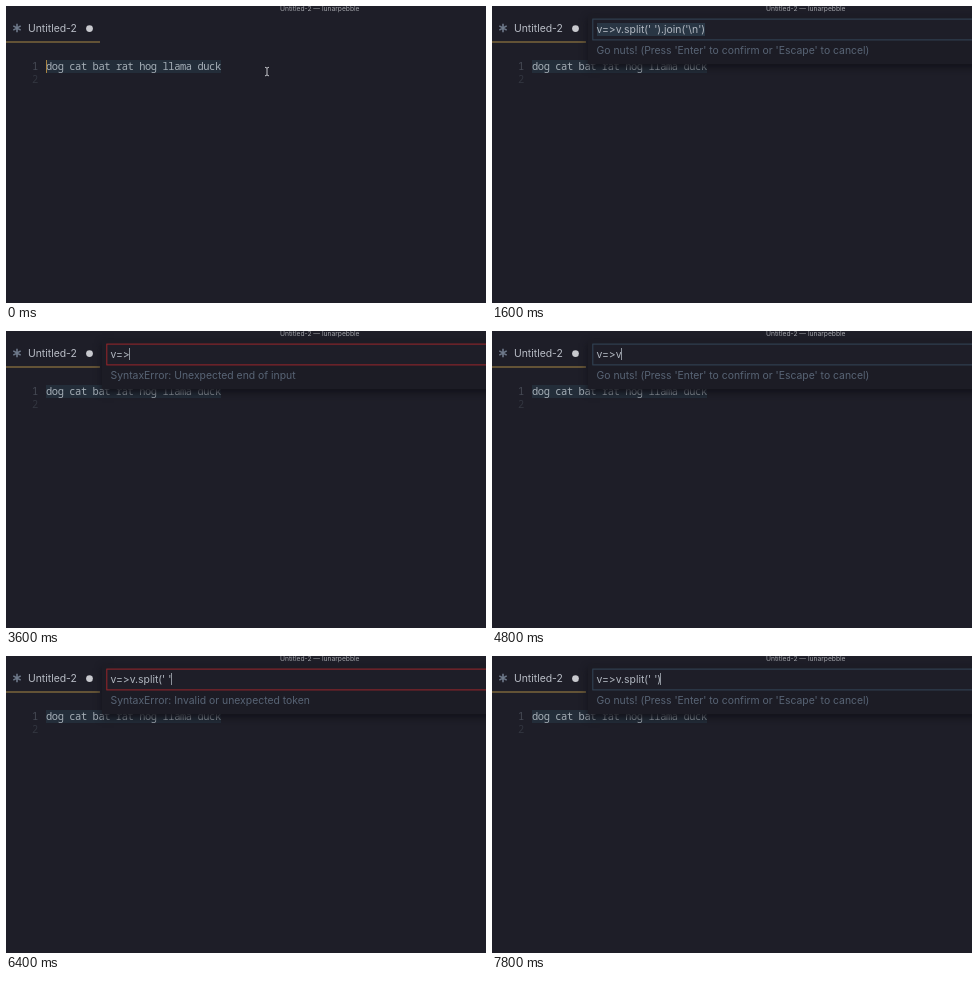
Recreate the animation shown at these times as an HTML page. Size 480 px wide and 297 px high, loop 8000 ms.

```html
<!DOCTYPE html>
<html lang="en">
<head>
<meta charset="utf-8">
<title>Editor</title>
<style>
  html, body { margin: 0; width: 100%; height: 100%; overflow: hidden; background: #1e1e28; }
  body {
    position: relative;
    font: 10.4px/17.64px Inter, Roboto, sans-serif;
    font-variant-ligatures: none;
    font-feature-settings: "calt" 0;
    color: #586475;
    white-space: pre;
  }
  body div, body svg { position: absolute; }
  [hidden] { display: none !important; }

  #title { left: 274px; top: -5px; line-height: 17px; font-size: 6.7px; color: #a3a5ab; }
  #tab { left: 22px; top: 14px; color: #b9bdc6; }
  #chrome { left: 0; top: 0; }

  .code { font: 10.4px/13.4px "Noto Sans Mono", "DejaVu Sans Mono", monospace; letter-spacing: -.41px; }
  .number { left: 26px; color: #474b56; }
  #words { left: 40px; top: 54px; color: #a6afb7; background: #232d39; }
  #editorCaret { left: 39.6px; top: 54px; width: 1.2px; height: 13px; background: #a98443; }

  #widget { left: 96px; top: 8px; width: 480px; background: #1c1c25; box-shadow: 0 4px 7px #12121a; }
  #frame { left: 0; top: 0; fill: #1e1e28; stroke: #324557; }
  #frame.error { stroke: #9a252b; }
  #input { left: 8.5px; top: 6px; line-height: 20.6px; color: #b2b8c1; }
  #input .selected { background: #293644; }
  #input .hint { color: #555b67; }
  #caret { display: inline-block; width: 1px; height: 12px; margin: 0 -.3px 0 -.7px; vertical-align: -2.2px; background: #8d929b; }
  #message { left: 8.5px; top: 27.7px; }
  #list { left: 0; top: 30.4px; width: 480px; }
  #list div { position: relative; height: 17.64px; padding-left: 8.5px; }
  #list div:first-child { background: #191920; }
  #list span { position: absolute; left: 359px; color: #424854; }
  #pointer { left: 0; top: 0; }
</style>
</head>
<body>
<div id="title">Untitled-2 — lunarpebble</div>
<svg id="chrome" width="100" height="40">
  <path transform="translate(11 22)" d="M0-4.3V4.3M-3.7-2.1 3.7 2.1M-3.7 2.1 3.7-2.1" stroke="#6e798a" stroke-width="1.6"/>
  <circle cx="83.5" cy="22.6" r="3.4" fill="#c8c9ce"/>
  <path d="M0 36H94" stroke="#a88744" stroke-width="1.1"/>
</svg>
<div id="tab">Untitled-2</div>

<div class="code number" style="top:54px">1</div>
<div class="code number" style="top:67.4px;color:#32353f">2</div>
<div class="code" id="words">dog cat bat rat hog llama duck</div>
<div id="editorCaret"></div>

<div id="widget" hidden>
  <svg id="frame" width="480" height="30"><rect x="4.8" y="5.1" width="490" height="20.8"/></svg>
  <div id="input"><span id="typed"></span><span id="caret"></span><span id="hint" class="hint"></span></div>
  <div id="message"></div>
  <div id="list"></div>
</div>

<svg id="pointer" width="480" height="297" fill="none" stroke-linejoin="round">
  <path id="beam" d="M259 61.3q2 0 2 1.3 0-1.3 2-1.3M261 62.6v6M259 69.8q2 0 2-1.3 0 1.3 2 1.3" stroke="#c5c6cb"/>
  <path id="hand" d="M259.5 65.2q0-1.1.9-1.1t.9 1.1v2.8l3.3.8q1.1.3 1 1.4l-.7 3.4h-4.1l-2.6-3.4q-.4-1.1.4-1.1l.9.7z" fill="#e6e6e9" stroke="#17171d" stroke-width=".6"/>
</svg>

<script>
const LOOP = 8000;
const FULL = "v=>v.split(' ').join('\\n')";
const OK = "Go nuts! (Press 'Enter' to confirm or 'Escape' to cancel)";
const NOT_FUNCTION = "TypeError: mapFn is not a function";
const UNDEFINED = "ReferenceError: v is not defined";
const END = "SyntaxError: Unexpected end of input";
const TOKEN = "SyntaxError: Invalid or unexpected token";
const PAREN = "SyntaxError: missing ) after argument list";

const commands = [
  "Lunarpebble (custom map function)",
  "Lunarpresets (preset map functions)",
  "Preferences: Open User Settings",
  "Preferences: Open Settings (JSON)",
  "Map and Replace Selections with JavaScript Function",
  "Lunarsorts (preset sorting functions)",
  "Developer: Show Running Extensions",
  "FVTidy: Create FVTidy configuration"
];

// Start time, typed text, validation message, caret visible
const prompts = [
  [1600, FULL, OK, false],
  [2600, "", OK, true],
  [2800, "", NOT_FUNCTION, true],
  [3000, "v", NOT_FUNCTION, true],
  [3200, "v", UNDEFINED, true],
  [3600, "v=>", END, true],
  [4200, "v=>", END, false],
  [4600, "v=>v", END, true],
  [4800, "v=>v", OK, true],
  [5000, "v=>v.", OK, true],
  [5200, "v=>v.s", END, true],
  [5400, "v=>v.spl", OK, true],
  [5600, "v=>v.split", OK, true],
  [5800, "v=>v.split(", OK, true],
  [6000, "v=>v.split(", END, true],
  [6200, "v=>v.split('", TOKEN, true],
  [6400, "v=>v.split(' '", TOKEN, true],
  [6600, "v=>v.split(' '", PAREN, true],
  [6800, "v=>v.split(' ')", PAREN, true],
  [7000, "v=>v.split(' ')", OK, true],
  [7400, "v=>v.split(' ')", OK, false],
  [7800, "v=>v.split(' ')", OK, true]
];

const get = id => document.getElementById(id);
const show = (id, on) => { get(id).style.display = on ? "" : "none"; };
const start = performance.now();

get("list").innerHTML = commands
  .map((name, i) => `<div>${name}${i ? "" : "<span>recently used</span>"}</div>`)
  .join("");

function render(t) {
  const open = t >= 600;
  const listing = open && t < 1600;
  const prompt = prompts.filter(([time]) => time <= t).pop();
  const [, text, message, caret] = prompt || [0, ">", "", t < 1000];

  get("widget").hidden = !open;
  get("widget").style.height = listing ? "176px" : "50px";
  show("editorCaret", !open);
  show("beam", !open);
  show("hand", open && t < 1200);
  show("list", listing);
  show("caret", caret);

  get("typed").textContent = text;
  get("typed").className = text === FULL ? "selected" : "";
  get("hint").textContent = text ? "" : FULL;
  get("message").textContent = message;
  get("frame").classList.toggle("error", message !== "" && message !== OK);
}

function tick() {
  render((performance.now() - start) % LOOP);
  requestAnimationFrame(tick);
}
tick();
</script>
</body>
</html>
```
